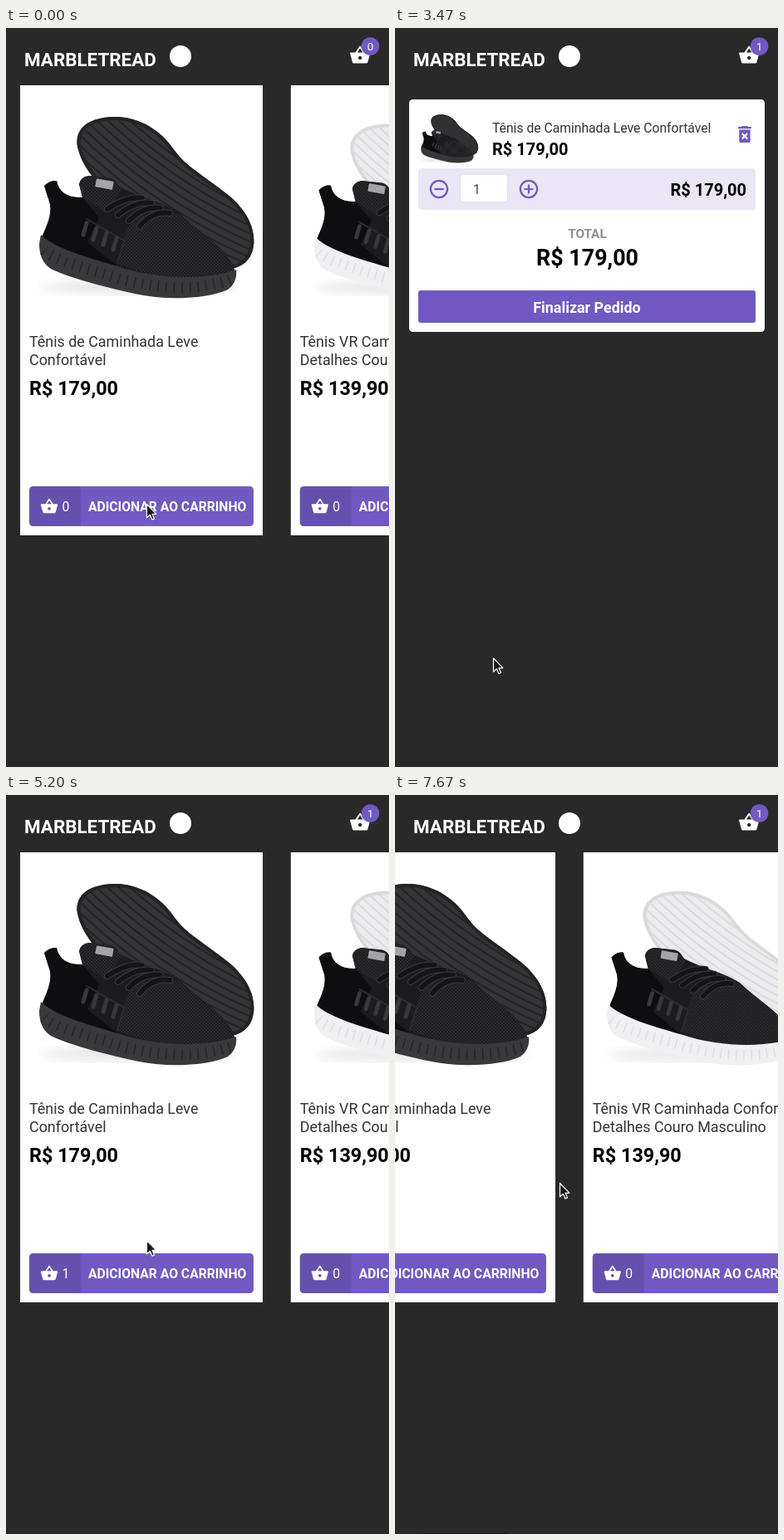
Animation of 461 by 890 pixels, one loop 8 s. Source, as an HTML page:

```html
<!DOCTYPE html>
<html lang="pt-BR">
<head>
<meta charset="utf-8">
<title>Loja de tênis</title>
<style>
  html, body { margin: 0; width: 100%; height: 100%; overflow: hidden; background: #292929; }
  svg { display: block; width: 461px; height: 890px; font-family: Roboto, sans-serif; }
  .bold { font-weight: 700; }
  .fade .bg { fill: #808080; opacity: .56; }
  .fade .pane { opacity: .3; }
  .fade .ink { opacity: .5; }
  .fade .muted { opacity: 0; }
</style>
</head>
<body>
<svg id="stage" viewBox="0 0 461 890"></svg>
<script>
const LOOP = 8000, TICKS_PER_MS = 0.015;
const PURPLE = '#7159c1';

const BASKET = 'M17.21 9l-4.38-6.56c-.19-.28-.51-.42-.83-.42-.32 0-.64.14-.83.43L6.79 9H2c-.55 0-1 .45-1 1 0 .09.01.18.04.27l2.54 9.27c.23.84 1 1.46 1.92 1.46h13c.92 0 1.69-.62 1.93-1.46l2.54-9.27L23 10c0-.55-.45-1-1-1zM9 9l3-4.4L15 9zm3 8c-1.1 0-2-.9-2-2s.9-2 2-2 2 .9 2 2-.9 2-2 2z';
const TRASH = 'M6 19c0 1.1.9 2 2 2h8c1.1 0 2-.9 2-2V7H6zm2.46-7.12l1.41-1.41L12 12.59l2.12-2.12 1.41 1.41L13.41 14l2.12 2.12-1.41 1.41L12 15.41l-2.12 2.12-1.41-1.41L10.59 14zM15.5 4l-1-1h-5l-1 1H5v2h14V4z';

const rect = (x, y, w, h, fill, r = 0, extra = '') =>
  `<rect x="${x}" y="${y}" width="${w}" height="${h}" rx="${r}" fill="${fill}" ${extra}/>`;
const text = (x, y, size, str, fill = '#000', extra = '') =>
  `<text x="${x}" y="${y}" font-size="${size}" fill="${fill}" ${extra}>${str}</text>`;
const bold = (x, y, size, str, fill = '#000', anchor = 'start', cls = '') =>
  text(x, y, size, str, fill, `class="bold ${cls}" text-anchor="${anchor}"`);
const icon = (d, x, y, scale, fill) =>
  `<path d="${d}" fill="${fill}" transform="translate(${x} ${y}) scale(${scale})"/>`;
const line = (d, stroke, width, extra = '') =>
  `<path d="${d}" fill="none" stroke="${stroke}" stroke-width="${width}" stroke-linecap="round" ${extra}/>`;
const shape = (d, fill) => `<path d="${d}" fill="${fill}"/>`;
const repeat = (n, fn) => Array.from({ length: n }, (_, i) => fn(i)).join('');

const SOLE_UP = 'M86 143C82 118 104 106 136 107C168 110 189 127 204 149C217 167 238 178 258 194C284 212 301 236 298 262C295 285 276 293 254 290L125 200C106 184 91 165 86 143Z';
const UPPER = 'M46 190Q53 183 61 184C63 197 74 205 92 204L88 188Q90 179 100 178L126 181Q133 183 136 191C158 203 190 210 207 222C235 248 268 266 276 294L270 306L190 314L41 258C46 243 56 228 53 212Z';
const HEEL = 'M46 190Q53 183 61 184C63 197 74 205 92 204L112 228L98 258L134 287L41 258C46 243 56 228 53 212Z';
const MIDSOLE = 'M42 249C58 265 96 276 134 287C188 305 246 302 277 291Q279 306 267 315C243 326 195 329 155 320C128 314 78 302 54 290Q40 281 40 260Z';

// Product shoe: an upright sole behind, a side view in front.
function shoe(back, rib, sole, groove) {
  const ribs = repeat(15, i => {
    const dx = (i - 7) * 5.6, dy = (7 - i) * 7;
    return line(`M${84 + dx} ${112 + dy}Q${185 + dx} ${212 + dy} ${305 + dx} ${262 + dy}`, rib, 2);
  });
  const laces = repeat(4, i => {
    const d = `M${122 + i * 13} ${218 + i * 7}Q${146 + i * 10} ${202 + i * 6} ${164 + i * 11} ${205 + i * 6}`;
    return line(d, '#3b3b3e', 8) + line(d, '#151517', 6);
  });
  return `
    <ellipse cx="160" cy="312" rx="118" ry="9" fill="#e8e8ea" filter="url(#soft)"/>
    ${shape(SOLE_UP, back)}<g clip-path="url(#soleClip)">${ribs}${line(SOLE_UP, rib, 8)}</g>
    ${shape(UPPER, '#1c1c1e')}
    ${shape('M154 226L207 223C235 248 268 266 275 293L200 306L136 285Q139 252 154 226Z', 'url(#mesh)')}
    ${shape('M92 204L88 188Q90 179 100 178L126 181L140 194L120 222Z', 'url(#mesh)')}
    ${shape(HEEL, '#0e0e10')}
    ${line('M97 230L142 256L134 283', '#2d2d30', 2)}
    ${repeat(4, i => line(`M${97 + i * 12} ${235 + i * 6}l-4 14`, '#38383c', 5))}${laces}
    ${rect(108, 183, 21, 10, '#a4a4a8', 1, 'transform="rotate(10 118 188)"')}
    ${shape(MIDSOLE, sole)}
    ${line('M46 268C58 280 100 290 140 303C190 316 240 315 271 303', groove, 13, 'stroke-dasharray="1.6 8" style="stroke-linecap:butt"')}`;
}
const BLACK_SHOE = shoe('#343437', '#232326', '#39393c', '#262629');
const WHITE_SHOE = `<g transform="translate(165 327) scale(.96) translate(-165 -327)">
  ${shoe('#ebebee', '#dadade', '#f0f0f2', '#dfdfe3')}</g>`;

const header = count => `<g class="ink">
  ${bold(22, 46, 22.4, 'MARBLETREAD', '#fff')}
  <circle cx="210" cy="34" r="13" fill="#fff"/>
  ${icon(BASKET, 413, 19.5, 1.1, '#fff')}
  <circle cx="438.5" cy="22" r="10.8" fill="${PURPLE}"/>
  ${text(438.5, 27, 13.5, count, '#fff', 'text-anchor="middle" class="count"')}</g>`;

const product = (x, art, lines, price, id, cls) => `<g transform="translate(${x} 0)">
  ${rect(17, 69, 292, 542, '#fff')}${art}
  ${lines.map((s, i) => text(28, 384.4 + i * 22, 17.9, s, '#333')).join('')}
  ${bold(28, 442.4, 23.4, price)}
  <g id="${id}">
    ${rect(28, 552, 270, 48, PURPLE, 4.5)}
    <path d="M90 552H32.5q-4.5 0-4.5 4.5v39q0 4.5 4.5 4.5H90z" fill="#000" opacity=".1"/>
    ${icon(BASKET, 41, 565, .92, '#fff')}
    ${text(67.5, 582.3, 15.7, '0', '#fff', `class="${cls}"`)}
    ${bold(99, 582.3, 15.7, 'ADICIONAR AO CARRINHO', '#fff')}
  </g></g>`;

const roundButton = (x, plus) =>
  `<circle cx="${x}" cy="194" r="10.1" fill="none" stroke="${PURPLE}" stroke-width="2.24"/>
  <path d="M${x - 5.6} 194h11.2${plus ? `M${x} 188.4v11.2` : ''}" stroke="${PURPLE}" stroke-width="2.24"/>`;

const home = `<g id="home">
  ${header(0)}
  <g id="list">
    ${product(0, BLACK_SHOE, ['Tênis de Caminhada Leve', 'Confortável'], 'R$ 179,00', 'press', 'count')}
    ${product(325.8, WHITE_SHOE, ['Tênis VR Caminhada Confortável', 'Detalhes Couro Masculino'], 'R$ 139,90', 'idle', '')}
  </g>
  ${rect(0, 888, 110, 2, '#202020', 0, 'id="thumb"')}</g>`;

const cart = `<g id="cart">
  ${rect(0, -3, 461, 893, '#292929', 0, 'class="bg"')}
  ${header(1)}
  ${rect(17, 86, 428, 280, '#fff', 4.5, 'class="pane"')}
  <g class="ink">
    ${rect(28, 97, 72, 72, '#fff')}
    <g transform="translate(28 97) scale(.267) translate(-28 -80)">${BLACK_SHOE}</g>
    ${text(117, 126, 15.7, 'Tênis de Caminhada Leve Confortável', '#333')}
    ${bold(117, 152.5, 20, 'R$ 179,00')}
    ${icon(TRASH, 407.5, 114.6, 1.12, PURPLE)}
  </g>
  ${rect(28, 169, 406, 50, '#eae6f5', 4, 'class="pane"')}
  <g class="ink">
    ${roundButton(53, false)}${roundButton(161, true)}
    ${rect(78.5, 176.5, 57, 33, '#fff', 4, 'stroke="#e2e0e8"')}
    ${text(94, 199.5, 15.7, '1', '#444')}
    ${bold(423, 202, 20, 'R$ 179,00', '#000', 'end')}
    ${bold(231.5, 253, 15.4, 'TOTAL', '#8f8f8f', 'middle', 'muted')}
    ${bold(231.5, 286, 26.9, 'R$ 179,00', '#000', 'middle')}
  </g>
  ${rect(28, 316, 406, 39, PURPLE, 3, 'class="pane"')}
  <g class="ink">${bold(231, 342.5, 17.9, 'Finalizar Pedido', '#fff', 'middle')}</g></g>`;

const stage = document.getElementById('stage');
stage.innerHTML = `<defs>
  <filter id="soft"><feGaussianBlur stdDeviation="6"/></filter>
  <clipPath id="soleClip"><path d="${SOLE_UP}"/></clipPath>
  <pattern id="mesh" width="4" height="4" patternUnits="userSpaceOnUse">
    ${rect(0, 0, 4, 4, '#2b2b2e')}${rect(0, 0, 2, 2, '#1c1c1f')}${rect(2, 2, 2, 2, '#1c1c1f')}
  </pattern></defs>
  ${rect(0, 0, 461, 890, '#292929')}${home}${cart}
  <path id="cursor" d="M0 0V16.4L3.8 12.8L6.4 18.6L9 17.5L6.5 11.8H11.4Z" fill="#161616" stroke="#fff" stroke-width="1.2" stroke-linejoin="round"/>`;

// Tracks hold [tick, ...values]; the screen refreshes once per tick.
const POINTER = [
  [0, 169, 573], [3, 169, 573], [4, 158, 579], [5, 138, 585], [6, 125, 584], [7, 120, 581],
  [40, 120, 581], [41, 124, 572], [44, 166, 518], [46, 187, 495], [48, 178, 540], [51, 130, 715],
  [53, 106, 802], [54, 100, 838], [55, 95, 868], [57, 94, 900], [65, 94, 900],
  [66, 133, 672], [67, 133, 672], [68, 169, 536], [88, 169, 536], [89, 180, 531],
  [92, 300, 488], [95, 371, 461], [96, 371, 461], [97, 345, 463], [98, 345, 463],
  [99, 308, 469], [101, 308, 469], [115, 308, 467]
];
const SCROLL = [[101, 0], [102, 20], [104, 20], [105, 45], [107, 45], [108, 60], [113, 108], [114, 108], [115, 116]];
const PRESS = [[14, 1], [15, .75], [16, .45], [17, .4], [18, .6], [19, .85], [20, 1]];
const ADDED = 37, LEAVE = 76, GONE = 78;

function at(track, tick) {
  const i = track.findIndex(k => k[0] >= tick);
  if (i < 0) return track[track.length - 1].slice(1);
  if (i === 0) return track[0].slice(1);
  const a = track[i - 1], b = track[i], p = (tick - a[0]) / (b[0] - a[0]);
  return a.slice(1).map((v, n) => v + (b[n + 1] - v) * p);
}

const [list, press, thumb, cartEl, cursor] =
  ['list', 'press', 'thumb', 'cart', 'cursor'].map(id => document.getElementById(id));
const counts = document.querySelectorAll('#home .count');

function draw(ms) {
  const tick = Math.floor((ms % LOOP) * TICKS_PER_MS + .06);
  const [x, y] = at(POINTER, tick), [scroll] = at(SCROLL, tick);
  const leaving = tick >= LEAVE && tick < GONE;
  cursor.setAttribute('transform', `translate(${x - scroll * .948 + .5} ${y + .5})`);
  list.setAttribute('transform', `translate(${-scroll} 0)`);
  thumb.setAttribute('x', scroll * .23);
  thumb.style.opacity = scroll > 0 ? 1 : 0;
  press.style.opacity = at(PRESS, tick)[0];
  counts.forEach(el => { el.textContent = tick < ADDED ? 0 : 1; });
  cartEl.style.display = tick >= ADDED && tick < GONE ? '' : 'none';
  cartEl.setAttribute('class', leaving ? 'fade' : '');
  cartEl.setAttribute('transform', `translate(0 ${leaving ? 48 : 0})`);
}

const start = performance.now();
function frame() {
  draw(performance.now() - start);
  requestAnimationFrame(frame);
}
frame();
</script>
</body>
</html>
```
